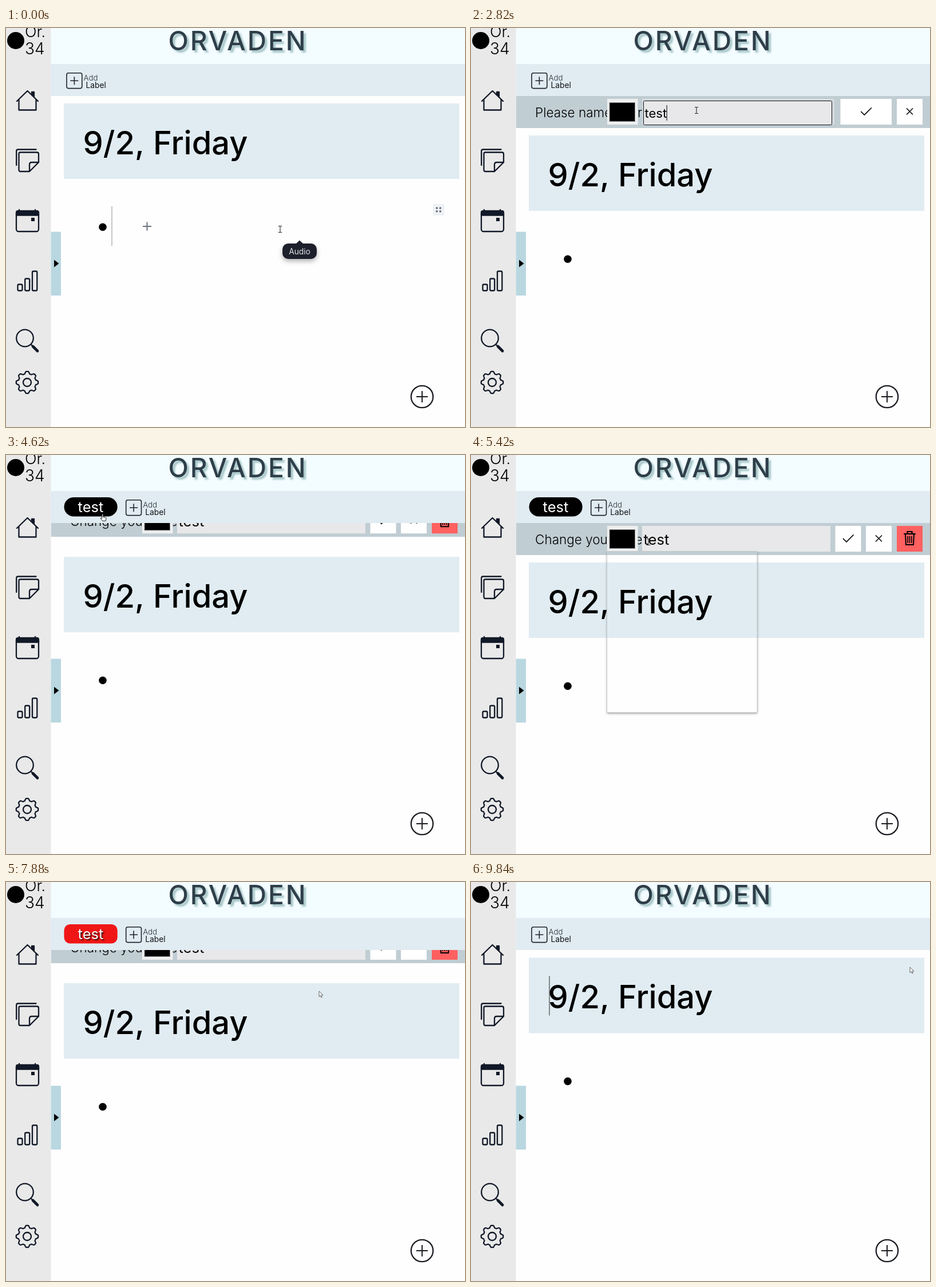
These frames come from a looping animation (802x698 px, 9890 ms). An HTML page with a canvas:

```html
<!DOCTYPE html>
<html lang="en">
<head>
<meta charset="utf-8">
<title>Journal labels</title>
<style>
html, body { margin: 0; width: 100%; height: 100%; overflow: hidden; background: #fefefe; }
canvas { display: block; width: 802px; height: 698px; }
</style>
</head>
<body>
<canvas id="stage" width="802" height="698"></canvas>
<script>
const ctx = document.getElementById('stage').getContext('2d');
const LOOP = 9890;
const INK = '#111827', LINE = 2.3;
const FONT = 'Inter, "Open Sans", sans-serif';
const BAR_Y = 119, BAR_H = 56;

// Each visit of the edit bar: open and close times, length of its closing slide
const visits = [
  { open: 1090, close: 3480, slide: 610 },
  { open: 4360, close: 6690, slide: 610 },
  { open: 7630, close: 9400, slide: 430 }
];
const KEYS = [2400, 2500, 2620, 2740];
const FOCUS = 2060, PICK_OPEN = 5390, PICKED = 5850, PICK_CLOSE = 6430;

// Pointer stops: time, x, y
const path = [
  [0, 479, 352], [120, 479, 352], [900, 121, 92], [1150, 121, 92],
  [2050, 394, 144], [2850, 394, 144], [3300, 690, 150], [3480, 690, 150],
  [3820, 472, 147], [4250, 150, 94], [4420, 150, 94], [5200, 264, 150],
  [5270, 264, 150], [5420, 310, 152], [5780, 462, 187], [5920, 462, 187],
  [6440, 654, 152], [6750, 654, 152], [7400, 150, 94], [7650, 150, 94],
  [7880, 547, 191], [8380, 772, 168], [8960, 767, 149], [LOOP, 767, 149]
];

const clamp = v => Math.max(0, Math.min(1, v));
const mix = (a, b, k) => a + (b - a) * k;

// cubic-bezier(.25, .1, .25, 1)
function ease(x) {
  if (x <= 0) return 0;
  if (x >= 1) return 1;
  const at = (s, a, b) => 3 * s * (1 - s) * (1 - s) * a + 3 * s * s * (1 - s) * b + s * s * s;
  let lo = 0, hi = 1;
  for (let i = 0; i < 24; i++) {
    const mid = (lo + hi) / 2;
    if (at(mid, .25, .25) < x) lo = mid; else hi = mid;
  }
  return at(lo, .1, 1);
}

function pointer(t) {
  let i = 0;
  while (i < path.length - 2 && path[i + 1][0] <= t) i++;
  const [t0, x0, y0] = path[i], [t1, x1, y1] = path[i + 1];
  const u = clamp((t - t0) / (t1 - t0)), k = u * u * (3 - 2 * u);
  return { x: mix(x0, x1, k), y: mix(y0, y1, k) };
}

function rect(x, y, w, h, fill) {
  ctx.fillStyle = fill;
  ctx.fillRect(x, y, w, h);
}

function round(x, y, w, h, r, fill, stroke, width) {
  ctx.beginPath();
  ctx.roundRect(x, y, w, h, r);
  if (fill) { ctx.fillStyle = fill; ctx.fill(); }
  if (stroke) { ctx.strokeStyle = stroke; ctx.lineWidth = width; ctx.stroke(); }
}

function dot(x, y, r, fill) {
  ctx.beginPath();
  ctx.arc(x, y, r, 0, 7);
  ctx.fillStyle = fill;
  ctx.fill();
}

function ring(x, y, r, color, width) {
  ctx.beginPath();
  ctx.arc(x, y, r, 0, 7);
  ctx.strokeStyle = color;
  ctx.lineWidth = width;
  ctx.stroke();
}

function trace(d, color, width, fill) {
  const p = new Path2D(d);
  if (fill) { ctx.fillStyle = fill; ctx.fill(p); }
  if (color) { ctx.strokeStyle = color; ctx.lineWidth = width; ctx.stroke(p); }
}

function text(s, x, y, size, color = '#000', weight = 400, align = 'left', spacing = 0) {
  ctx.font = `${weight} ${size}px ${FONT}`;
  ctx.letterSpacing = spacing + 'px';
  ctx.textAlign = align;
  ctx.fillStyle = color;
  ctx.fillText(s, x, y);
}

function plus(x, y, r, color, width) {
  trace(`M${x - r} ${y}h${2 * r}M${x} ${y - r}v${2 * r}`, color, width);
}

function shadow(color, blur, dx, dy, draw) {
  ctx.save();
  ctx.shadowColor = color;
  ctx.shadowBlur = blur;
  ctx.shadowOffsetX = dx;
  ctx.shadowOffsetY = dy;
  draw();
  ctx.restore();
}

function sidebar() {
  rect(0, 0, 78.5, 698, '#e9e9e9');
  dot(17, 22, 15, '#000');
  text('Or.', 33, 16, 27, '#000', 300);
  text('34', 33, 46, 28, '#000', 300);

  ctx.lineCap = ctx.lineJoin = 'round';
  trace('M19 128L37.5 110L56 128M22.5 126V143.5H52.500V126', INK, LINE);
  trace('M45 112h4v8l-4-4z', INK, LINE, INK);

  trace('M18.200 240V215.500Q18.200 212.500 21 212.500H52.500', INK, LINE);
  trace('M25 217.500H54Q57 217.500 57 220.500V235L41 251H25Q22.500 251 22.500 248V220Q22.500 217.500 25 217.500ZM57 235H45Q41 235 41 239V251', INK, LINE);

  round(18, 321, 39, 35, 4, null, INK, LINE);
  trace('M18 327.500V323Q18 320 21 320H54Q57 320 57 323V327.500ZM23 318v4M51 318v4', INK, LINE, INK);
  rect(44, 332, 6, 6, INK);

  round(20.5, 448.5, 8, 11, 2, null, INK, LINE);
  round(33.2, 438.5, 8, 21, 2, null, INK, LINE);
  round(46, 425.5, 8.3, 34, 2, null, INK, LINE);

  ring(33, 542.5, 14.8, INK, LINE);
  trace('M44 554L47 557', INK, LINE);
  trace('M47 557L55 565', INK, 4.8);

  ctx.beginPath();
  for (let i = 0; i < 240; i++) {
    const a = i / 240 * 2 * Math.PI;
    const r = 17.3 + 1.9 * Math.max(-1, Math.min(1, 1.5 * Math.cos(8 * a)));
    ctx.lineTo(37 + r * Math.cos(a), 620 + r * Math.sin(a));
  }
  ctx.closePath();
  ctx.strokeStyle = INK;
  ctx.lineWidth = LINE;
  ctx.stroke();
  ring(37, 620, 7, INK, LINE);
  ctx.lineCap = 'butt';
  ctx.lineJoin = 'miter';

  rect(78.5, 356.5, 17.5, 111.5, '#b9d7e0');
  trace('M84 405.5L92.5 412L84 418.5Z', null, 0, '#000');
}

function content(t, y) {
  ctx.save();
  ctx.translate(0, y);
  rect(101, 132, 691, 132, '#e0ecf2');
  text('9/2, Friday', 134.5, 220.5, 56, '#000', 500);
  dot(169, 348.2, 6.8, '#000');
  if (t < visits[0].open) {
    rect(184.5, 312, 1, 69, '#8d8d8d');
    plus(246.5, 347, 7.5, '#6b7280', 2);
    rect(746, 308, 20, 20, '#eff2f5');
    for (const x of [752.8, 758.8]) for (const d of [315, 320.7]) dot(x, d, 1.8, '#5f6672');
  }
  if (t >= visits[2].close) rect(136.5, 164, 1, 69, '#222');
  ctx.restore();

  ctx.globalAlpha = clamp((140 - t) / 90);
  if (ctx.globalAlpha > 0) {
    shadow('rgba(0,0,0,.3)', 9, 0, 4, () => round(483, 377, 60, 27, 10, '#1d202b'));
    trace('M506.500 377.500L513 371.500L519.500 377.500Z', null, 0, '#1d202b');
    text('Audio', 513, 395.5, 13.8, '#dfe2e8', 400, 'center');
  }
  ctx.globalAlpha = 1;
}

function labelBar(t) {
  rect(78.5, 0, 724, 63, '#f3fcff');
  shadow('#a5c5c6', 3, 4, 4, () => text('ORVADEN', 405, 38.5, 46, '#2e3e49', 500, 'center', 3));
  rect(78.5, 63, 724, 56, '#e0ebf2');

  const tagged = t >= visits[0].close && t < visits[2].close;
  if (tagged) {
    const k = ease((t - visits[1].close) / 500);
    const over = ease((t - 7380) / 250) - ease((t - 7860) / 400);
    round(101.5, 74, 93.2, 33.5, 16.75 - 6.5 * over, `rgb(${240 * k},${22 * k},${22 * k})`);
    shadow('rgba(0,0,0,.8)', 2, 2, 2, () => text('test', 148, 100, 25.5, '#fff', 400, 'center'));
  }
  const x = tagged ? 103.7 : 0;
  round(x + 106, 78.8, 26.8, 26.8, 3, null, '#20242a', 1.6);
  plus(x + 119.4, 92.2, 7, '#20242a', 1.6);
  text('Add', x + 135.5, 91.5, 13.3, '#2b3036', 300);
  text('Label', x + 139.5, 105, 13.8, '#101316');
}

function checkMark(x, y, color) {
  trace(`M${x - 9} ${y}L${x - 3} ${y + 6}L${x + 9.5} ${y - 6.5}`, color, 1.7);
}

function trash(x, y) {
  ctx.lineCap = 'round';
  trace(`M${x - 9.500} ${y - 8}h19M${x - 4} ${y - 9}v-3h8v3`, '#000', 2.2);
  trace(`M${x - 7.500} ${y - 7}l1 18h13l1 -18`, '#000', 2);
  for (const d of [-3.3, 0, 3.3]) trace(`M${x + d} ${y - 3.500}v11`, '#000', 1.6);
  ctx.lineCap = 'butt';
}

function editBar(t, n, shown, over) {
  if (shown <= 0) return;
  ctx.save();
  ctx.beginPath();
  ctx.rect(78.5, BAR_Y, 724, shown);
  ctx.clip();
  ctx.translate(0, shown - BAR_H);
  rect(78.5, BAR_Y, 724, BAR_H, '#c0cdd3');
  const adding = n === 0;
  text(adding ? 'Please name you' : 'Change you', 112, 155.5, 22.5, '#000', 350);
  text(adding ? 'r' : 'e', adding ? 291 : 286.5, 155.5, 22.5, '#000', 350);

  rect(238, 124, 53.5, 45, '#efefef');
  rect(241.5, 130, 45.5, 34, '#8a8f93');
  rect(242.5, 131, 43.5, 32, n === 1 && t >= PICKED ? '#f01616' : '#000');

  const fieldW = adding ? 336 : 329;
  rect(299, 124, fieldW, 45, '#e8e8ea');
  if (adding && t >= FOCUS && t < visits[0].close) {
    rect(299, 124, fieldW, 45, '#d5dbdf');
    round(301.5, 127.5, 329, 42, 2, '#e8e8ea', '#111', 1);
    const typed = 'test'.slice(0, KEYS.filter(k => t >= k).length);
    text(typed, 303.5, 157, 22);
    rect(303 + (typed ? ctx.measureText(typed).width : 0), 135, 1, 27, '#000');
  } else if (!adding) {
    text('test', 301.5, 156.5, 25.5);
  }

  const okX = adding ? 645.5 : 636.5, okW = adding ? 89.5 : 45;
  rect(okX, 124, okW, 45, over === 'ok' ? '#174f75' : '#fff');
  checkMark(okX + okW / 2, 146, over === 'ok' ? '#fff' : '#000');
  const noX = adding ? 744 : 690;
  rect(noX, 124, 45, 45, '#fff');
  const cx = noX + 22.5;
  trace(`M${cx - 5.500} 140.500l11 11m0 -11l-11 11`, '#000', 1.5);
  if (!adding) {
    rect(744, 124, 45, 45, '#ff6060');
    trash(766.5, 146);
  }
  ctx.restore();
}

function gradient(x0, y0, x1, y1, stops) {
  const g = ctx.createLinearGradient(x0, y0, x1, y1);
  stops.forEach((c, i) => g.addColorStop(i / (stops.length - 1), c));
  return g;
}

function picker(t) {
  if (t < PICK_OPEN || t >= PICK_CLOSE) return;
  const x = 237.5, y = 168.5, w = 262.5, h = 282;
  // Shadow outside the popup only
  ctx.save();
  ctx.beginPath();
  ctx.rect(x - 10, y, w + 20, h + 10);
  ctx.rect(x, y, w, h);
  ctx.clip('evenodd');
  shadow('rgba(0,0,0,.45)', 4, 0, 1, () => rect(x, y, w, h, '#fff'));
  ctx.restore();
  round(x, y, w, h, 0, null, '#c4c8ca', 1);

  ctx.globalAlpha = clamp((t - 5430) / 60);
  if (ctx.globalAlpha > 0) {
    rect(x + .5, y + .5, w - 1, h - 1, '#fff');
    rect(x, y, w, 156, gradient(x, 0, x + w, 0, ['#fff', '#f00']));
    rect(x, y, w, 156, gradient(0, y, 0, y + 156, ['rgba(0,0,0,0)', '#000']));
    const picked = t >= PICKED;
    ring(picked ? x + .91 * w : x + 6, picked ? y + 10 : y + 150, 5, '#fff', 2);
    dot(x + 66, y + 183, 13, picked ? '#f01616' : '#000');
    round(x + 98, y + 178, 146, 10, 5, gradient(x + 98, 0, x + 244, 0,
      ['#f00', '#ff0', '#0f0', '#0ff', '#00f', '#f0f', '#f00']));
    dot(x + 103, y + 183, 7, '#f00');
    ring(x + 103, y + 183, 7, '#fff', 2);
    ['R', 'G', 'B'].forEach((c, i) => {
      const bx = x + 18 + i * 72;
      round(bx, y + 214, 62, 25, 2, '#fff', '#c4c8ca', 1);
      text(picked ? [240, 22, 22][i] : '0', bx + 31, y + 231, 12, '#222', 400, 'center');
      text(c, bx + 31, y + 258, 12, '#222', 400, 'center');
    });
  }
  ctx.globalAlpha = 1;
}

function drawPointer(kind, x, y) {
  if (kind === 'text') {
    trace(`M${x - 3} ${y - 5.500}h2.500l.5 .5l.5 -.5h2.500M${x} ${y - 5}v10M${x - 3} ${y + 5.500}h2.500l.5 -.5l.5 .5h2.500`, '#111', 1);
  } else if (kind === 'hand') {
    trace(`M${x - 1} ${y + 1}q1 -1.500 2 0v4l4 1q1.500 .5 1.200 2l-.8 4h-5.500l-3.500 -4.500q.5 -1.500 2.600 0z`, '#222', 1, '#fff');
  } else {
    trace(`M${x} ${y}v9.500l2.200 -2l1.500 3.500l1.700 -.7l-1.500 -3.400h3z`, '#555', .9, '#fff');
  }
}

function draw(t) {
  let n = 0;
  while (n < 2 && t >= visits[n + 1].open) n++;
  const v = visits[n];
  const closing = t >= v.close;
  const push = BAR_H * (closing ? 1 - ease((t - v.close) / 500) : ease((t - v.open) / 500));
  const shown = BAR_H * (closing ? 1 - ease((t - v.close) / v.slide) : ease((t - v.open) / 1000));

  const { x, y } = pointer(t);
  const inside = (a, b, c, d) => x >= a && x <= b && y >= c && y <= d;
  const top = Math.max(BAR_Y, 124 + shown - BAR_H), bottom = 169 + shown - BAR_H;
  let over = '';
  if (inside(n ? 636.5 : 645.5, n ? 681.5 : 735, top, bottom)) over = 'ok';
  else if (inside(744, 789, top, bottom)) over = 'end';
  else if (inside(299, 630, top, bottom)) over = 'field';
  else if (inside(102, 195, 74, 107)) over = 'label';

  rect(0, 0, 802, 698, '#fefefe');
  content(t, push);
  editBar(t, n, shown, over);
  labelBar(t);
  sidebar();
  ring(727, 645, 19.2, '#1c1f24', LINE);
  plus(727, 645, 10, '#1c1f24', 2);
  picker(t);

  const writing = over === 'field' || (t < visits[0].open && y > 270);
  drawPointer(writing ? 'text' : over ? 'hand' : 'arrow', x, y);
}

const start = performance.now();
function tick() {
  draw((performance.now() - start) % LOOP);
  requestAnimationFrame(tick);
}
tick();
</script>
</body>
</html>
```
